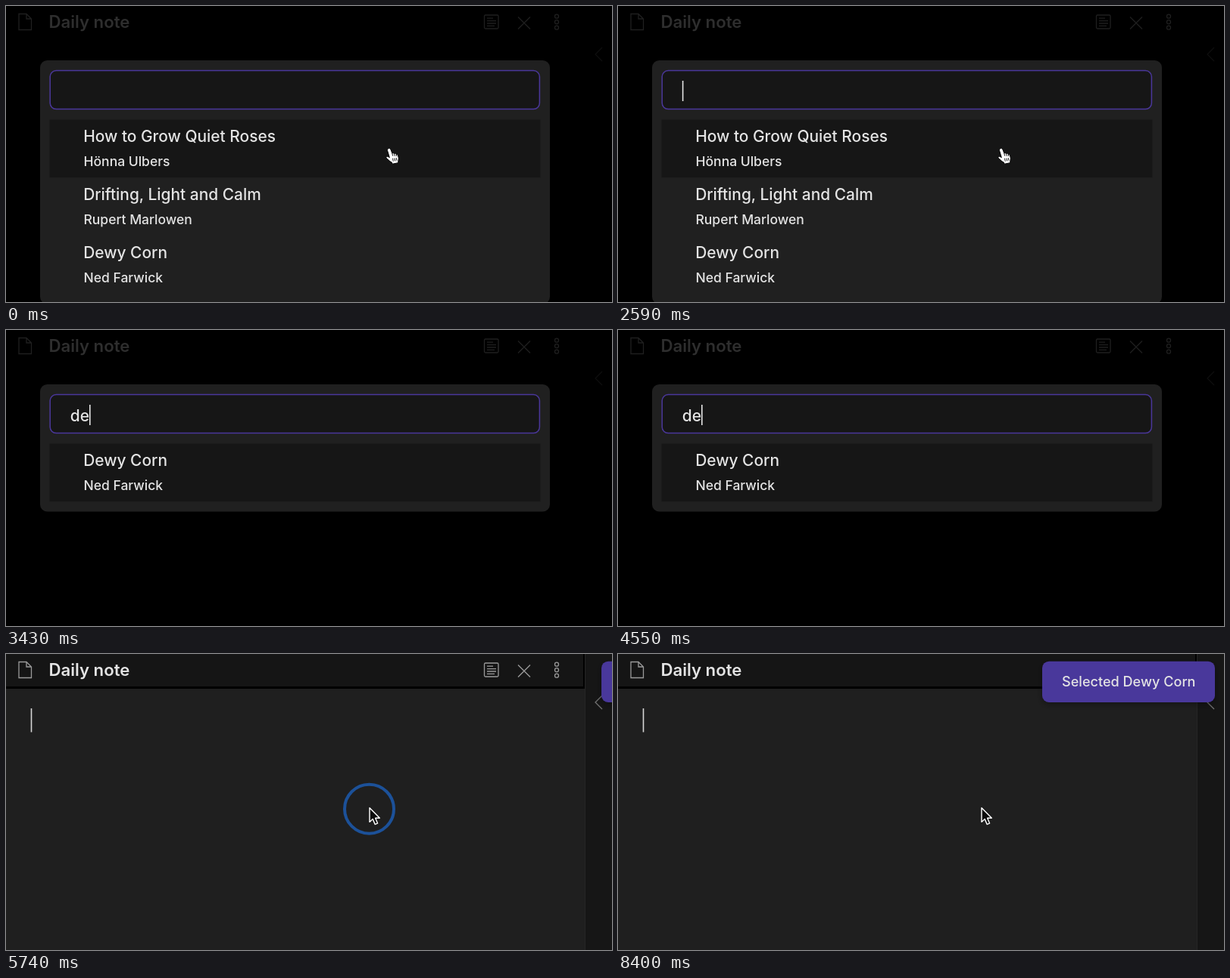
Recreate the animation shown at these times as an HTML page. Size 800 by 392 pixels, loop 8.47 s.

```html
<!DOCTYPE html>
<html lang="en">
<head>
<meta charset="utf-8">
<title>Book picker</title>
<style>
  html, body { margin: 0; width: 100%; height: 100%; overflow: hidden; background: #000; }
  svg { display: block; width: 100%; height: 100%; }
  text { font-family: Inter, Roboto, sans-serif; font-weight: 450; fill: #e4e4e4; white-space: pre; }
  .title { font-size: 20.9px; }
  .author { font-size: 17.5px; }
  .icon { fill: none; stroke: #9a9a9a; stroke-width: 1.3; }
</style>
</head>
<body>
<svg viewBox="0 0 800 392" xmlns="http://www.w3.org/2000/svg">
  <defs>
    <filter id="shadow" x="-10%" y="-30%" width="120%" height="170%">
      <feDropShadow dx="0" dy="3" stdDeviation="4" flood-color="#000" flood-opacity=".35"/>
    </filter>
  </defs>
  <rect width="800" height="392" fill="#000"/>

  <g id="panes">
    <rect width="762" height="43" fill="#151515"/>
    <rect y="46" width="764" height="346" fill="#1f1f1f"/>
    <rect x="765" width="35" height="392" fill="#161616"/>
    <path d="M764.5 0V392" stroke="#262626"/>
  </g>
  <g id="header">
    <path class="icon" d="M17 10.5H27L33.5 17V31.5H17ZM27 10.5V17H33.5"/>
    <text x="56.4" y="28.7" font-size="22.2" style="font-weight:600">Daily note</text>
    <rect class="icon" x="631.5" y="12" width="18.5" height="18" rx="1.5"/>
    <path class="icon" d="M635 16.2H643M635 19.6H647M635 23H647M635 26.4H645"/>
    <path class="icon" d="M676 14.5L692 30.5M692 14.5L676 30.5"/>
    <g class="icon">
      <circle cx="727" cy="13.7" r="2.5"/>
      <circle cx="727" cy="21.2" r="2.5"/>
      <circle cx="727" cy="28.7" r="2.5"/>
    </g>
  </g>
  <path id="chevron" class="icon" d="M787 55L778 64L787 73"/>
  <rect id="editCaret" x="32.7" y="72" width="1.6" height="31.5" fill="#d6d6d6"/>

  <g id="modal">
    <rect id="box" x="45" y="72" width="673" rx="9.5" fill="#202020"/>
    <rect x="58.2" y="85.6" width="646.2" height="51" rx="8" fill="#161616" stroke="#4a379b" stroke-width="1.5"/>
    <rect x="57.5" y="150.5" width="648" height="76.7" fill="#161616"/>
    <text id="query" class="title" x="84.8" y="120.5"></text>
    <rect id="caret" y="99" width="1.6" height="27" fill="#e4e4e4"/>
    <g id="rows"></g>
  </g>

  <g id="toast">
    <rect x="560" y="9.7" width="228" height="54.3" rx="9" fill="#4a379b" filter="url(#shadow)"/>
    <text id="notice" x="586" y="43.4" font-size="18.1"></text>
  </g>

  <circle id="ring" cx="479.5" cy="205.2" fill="none" stroke="#1c5199" stroke-width="4"/>
  <g id="hand" fill="#fff" stroke="#000" stroke-width="1" stroke-linejoin="round">
    <path d="M3.2 1.2C4.6 .4 6 1 6.6 2.4L8.6 7.4C9.6 6.6 10.8 7 11.2 8C12.2 7.2 13.6 7.8 13.9 8.8C15 8.4 16 9.2 16.2 10.4C17 13 17.2 14.4 16.6 17L16.4 20L9 21.5L8 19.5C5 18 3 15.5 .8 13.6C0 12.4 1.4 11 3 11.7L5 13L2.2 3.6C2 2.4 2.4 1.6 3.2 1.2Z"/>
    <path d="M8.4 7.4L9.6 11M11.2 8L12.2 11.2M13.9 8.8L14.6 11.4M9.2 14L10 18M11.6 13.8L12.4 17.6M13.9 13.4L14.6 17" fill="none" stroke-width=".9"/>
  </g>
  <path id="arrow" transform="translate(480 203.8)" d="M0 0V18.6L4.2 14.8L7.2 21.8L10.6 20.4L7.6 13.5H13.3Z" fill="#0a0a0a" stroke="#fff" stroke-width="1.4" stroke-linejoin="round"/>
</svg>
<script>
const LOOP = 8470, CLOSE = 5740;
const BOOKS = [
  ["How to Grow Quiet Roses", "Hönna Ulbers"],
  ["Drifting, Light and Calm", "Rupert Marlowen"],
  ["Dewy Corn", "Ned Farwick"]
];
// The caret starts hidden and flips at each of these times.
const BLINKS = [630, 1120, 1610, 2100, 2590, 3150, 3430, 3920, 4410, 4970, 5390, 6370, 6860, 7420, 7910];

const $ = id => document.getElementById(id);
const show = (el, on) => el.setAttribute("visibility", on ? "visible" : "hidden");
const clamp = x => Math.min(1, Math.max(0, x));
const span = (t, a, b) => clamp((t - a) / (b - a));
const easeOut = x => 1 - (1 - x) ** 3;

function addText(parent, cls, x, y, value) {
  const el = document.createElementNS("http://www.w3.org/2000/svg", "text");
  el.setAttribute("class", cls);
  el.setAttribute("x", x);
  el.setAttribute("y", y);
  el.textContent = value;
  parent.append(el);
}

const rows = BOOKS.map(([title, author]) => {
  const g = document.createElementNS("http://www.w3.org/2000/svg", "g");
  addText(g, "title", 102.2, 180.4, title);
  addText(g, "author", 102.5, 211.5, author);
  $("rows").append(g);
  return { g, key: (title + " " + author).toLowerCase() };
});
$("notice").textContent = "Selected " + BOOKS[2][0];

function drawModal(query, caretOn) {
  let count = 0;
  for (const { g, key } of rows) {
    const match = key.includes(query);
    g.setAttribute("display", match ? "inline" : "none");
    if (match) g.setAttribute("transform", `translate(0 ${77 * count++})`);
  }
  $("box").setAttribute("height", 91.5 + 77 * count);
  if ($("query").textContent !== query) $("query").textContent = query;
  $("caret").setAttribute("x", 84.8 + (query ? $("query").getComputedTextLength() : 0));
  $("caret").setAttribute("opacity", caretOn ? 1 : 0);
}

function drawRing(t) {
  const on = t >= 5530 && t < 6020;
  show($("ring"), on);
  if (!on) return;
  const r = 20 + 12.5 * span(t, 5510, 5740) ** 0.7 + 2 * span(t, 5740, 5950);
  const alpha = (0.3 + 0.7 * span(t, 5530, 5740)) * (1 - span(t, 5800, 6020));
  $("ring").setAttribute("r", r);
  $("ring").setAttribute("opacity", alpha);
}

function draw(t) {
  const open = t < CLOSE;
  const caretOn = BLINKS.filter(b => b <= t).length % 2 === 1;

  $("panes").setAttribute("display", open ? "none" : "inline");
  $("modal").setAttribute("display", open ? "inline" : "none");
  $("header").setAttribute("opacity", open ? 0.2 : 1);
  $("chevron").setAttribute("opacity", open ? 0.09 : 0.7);
  show($("editCaret"), !open && caretOn);
  if (open) drawModal(t < 2660 ? "" : t < 3430 ? "d" : "de", caretOn);

  show($("toast"), !open);
  const slide = 228 * (1 - easeOut(span(t, CLOSE, CLOSE + 350)));
  $("toast").setAttribute("transform", `translate(${slide} 0)`);

  drawRing(t);
  const early = t < 2660;
  show($("hand"), early || (t >= 5110 && open));
  $("hand").setAttribute("transform", early ? "translate(501.3 187.7)" : "translate(474.3 205.7)");
  show($("arrow"), !open);
}

const start = performance.now();
function tick() {
  draw((performance.now() - start) % LOOP);
  requestAnimationFrame(tick);
}
tick();
</script>
</body>
</html>
```
